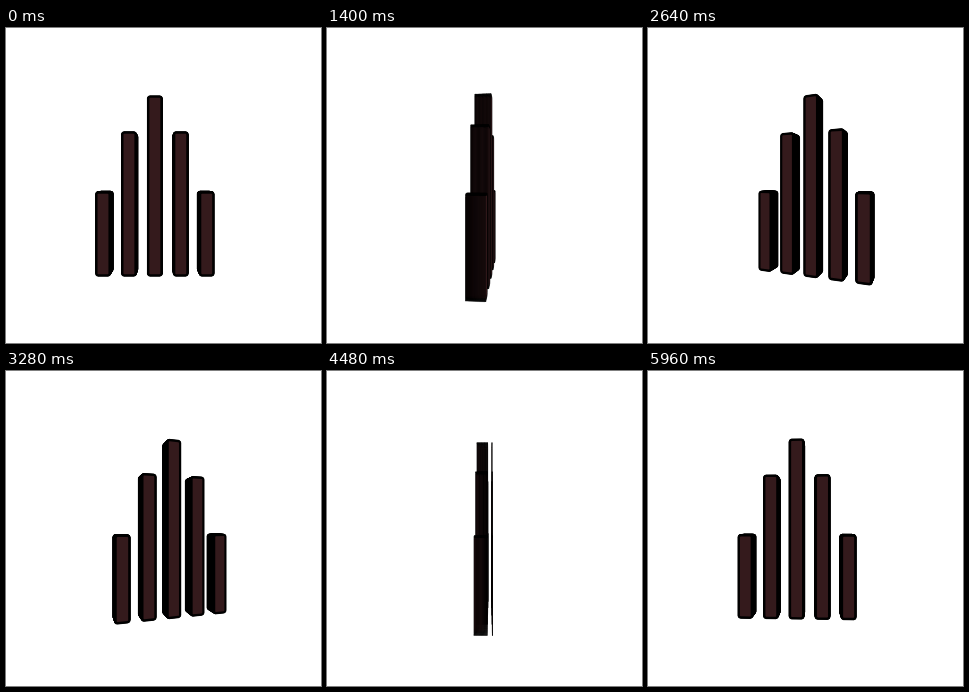
An HTML page with a canvas for the animation above (6000 ms loop, 315 by 315 pixels).

```html
<!DOCTYPE html>
<html>
<head>
<meta charset="utf-8">
<title>Rotating bars</title>
<style>
html, body { margin: 0; width: 100%; height: 100%; overflow: hidden; background: #fff; }
canvas { display: block; }
</style>
</head>
<body>
<canvas id="stage" width="315" height="315"></canvas>
<script>
const ctx = document.getElementById('stage').getContext('2d');
const LOOP = 6000, CENTER = 157.5, CAMERA = 265;
const HALF_WIDTH = 7.2, HALF_DEPTH = 7.5, LAYER_STEP = 0.75;
const BORDER = 1.9, BOTTOM = 88.1, FACE = '#341a1c';

const bars = [6, -52.2, -87.1, -52.2, 6].map((top, i) => ({ x: -58.8 + 25.2 * i, top }));
const layers = Array.from({ length: 2 * HALF_DEPTH / LAYER_STEP + 1 }, (_, i) => i * LAYER_STEP - HALF_DEPTH);

const farthestFirst = (list, distance) => [...list].sort((a, b) => distance(b) - distance(a));

// Traces a rounded rectangle lying in the plane z, seen in perspective.
function trace(left, top, right, bottom, radius, z, sin, cos) {
  const project = (x, y) => {
    const scale = CAMERA / (CAMERA + x * sin - z * cos);
    return [CENTER + (x * cos + z * sin) * scale, CENTER + y * scale];
  };
  const corner = (x, y, x1, y1, x2, y2) => {
    ctx.lineTo(...project(x + x1 * radius, y + y1 * radius));
    ctx.quadraticCurveTo(...project(x, y), ...project(x + x2 * radius, y + y2 * radius));
  };
  ctx.beginPath();
  corner(left, top, 0, 1, 1, 0);
  corner(right, top, -1, 0, 0, 1);
  corner(right, bottom, 0, -1, -1, 0);
  corner(left, bottom, 1, 0, 0, -1);
  ctx.closePath();
}

function drawBar({ x, top }, order, sin, cos) {
  const left = x - HALF_WIDTH, right = x + HALF_WIDTH;
  for (const z of order) {
    trace(left, top, right, BOTTOM, 2.4, z, sin, cos);
    ctx.fillStyle = '#000';
    ctx.fill();
    ctx.stroke();
    trace(left + BORDER, top + BORDER, right - BORDER, BOTTOM - BORDER, 0.8, z, sin, cos);
    ctx.fillStyle = FACE;
    ctx.fill();
  }
}

function draw(time) {
  const angle = (time % LOOP) / LOOP * 2 * Math.PI;
  const sin = Math.sin(angle), cos = Math.cos(angle);
  // Camera position in the coordinates of the turning group.
  const cameraX = -CAMERA * sin, cameraZ = CAMERA * cos;
  const offset = z => Math.abs(z - cameraZ);
  // Layers seen edge-on vanish.
  const order = farthestFirst(layers, offset).filter(z => offset(z) > 2);

  ctx.fillStyle = '#fff';
  ctx.fillRect(0, 0, 315, 315);
  ctx.strokeStyle = '#000';
  ctx.lineWidth = 0.8;
  ctx.lineJoin = 'round';
  for (const bar of farthestFirst(bars, b => Math.abs(b.x - cameraX))) {
    drawBar(bar, order, sin, cos);
  }
}

const start = performance.now();
function tick() {
  draw(performance.now() - start);
  requestAnimationFrame(tick);
}
tick();
</script>
</body>
</html>
```
